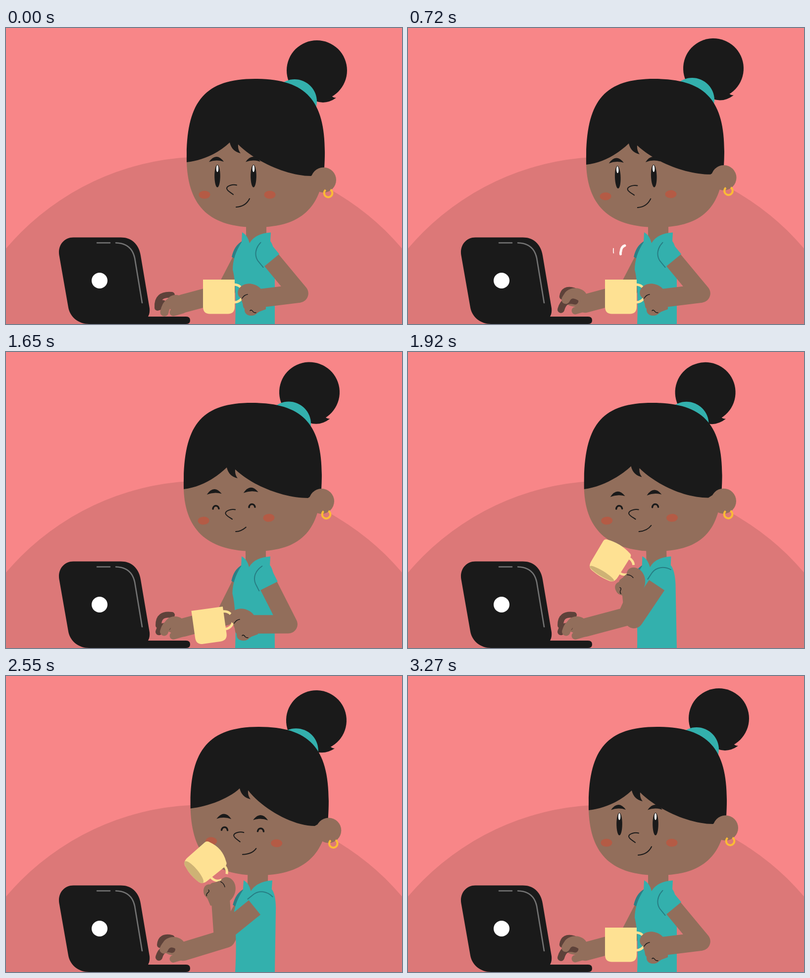
An HTML page that plays this animation: 800 by 600 pixels, repeating every 3.3 s.

```html
<!DOCTYPE html>
<html lang="en">
<head>
<meta charset="utf-8">
<title>Coffee break</title>
<style>
  html, body { margin: 0; width: 100%; height: 100%; overflow: hidden; background: #f88688; }
  svg { display: block; width: 100vw; height: 100vh; }
  .skin { fill: #926e5b; }
  .ink { fill: #1a1a1a; }
  .teal { fill: #33b0ad; }
  .line { fill: none; stroke: #1a1a1a; stroke-width: 2; stroke-linecap: round; }
  .limb { fill: none; stroke: #926e5b; stroke-width: 37.5; stroke-linecap: round; stroke-linejoin: round; }
  .finger { fill: none; stroke: #926e5b; stroke-linecap: round; }
  .far { fill: none; stroke: #5e423a; stroke-linecap: round; }
  .steam { fill: none; stroke: #fff5f3; stroke-linecap: round; }
  .seam { fill: none; stroke: #277d83; stroke-width: 2; stroke-linecap: round; }
</style>
</head>
<body>
<svg viewBox="0 0 800 600">
  <rect width="800" height="600" fill="#f88688"/>
  <circle cx="400" cy="784" r="523" fill="#dc7878"/>

  <g id="laptop">
    <path class="ink" d="M136 424.500H232C257 424.500 269 442 272 461L290 568Q291 578 287 585H364Q372 585 372 592.500T364 600H168C147 600 130 587 126 567L107.500 461C104 441 117 424.500 136 424.500Z"/>
    <path d="M184 435.500H210M222 435.500C245 436 256 448 260 466L275 557" fill="none" stroke="#747474" stroke-width="2.600" stroke-linecap="round"/>
    <circle cx="189" cy="512" r="16" fill="#fff"/>
  </g>

  <g id="farArm">
    <path class="far" id="farTop" stroke-width="12"/>
    <ellipse class="skin" id="palm"/>
    <path class="limb" id="farLimb"/>
    <path class="far" id="farLow" stroke-width="14"/>
    <path class="finger" id="index" stroke-width="17"/>
    <path class="finger" d="M357 566L338 571.500" stroke-width="15" id="thumb"/>
  </g>

  <g id="torso">
    <path d="M477 432Q461 441 456 464L463 468L478 445Z" fill="#2c7f85"/>
    <path class="skin" d="M485 380H526V425L492 440L485 425Z"/>
    <path class="teal" d="M477 414Q488 420 492 436Q504 416 535 414.500L534 432Q542 442 543 470V600H463Q466 520 458 490Q458 462 476 434Z"/>
  </g>

  <g id="bun">
    <circle class="ink" r="61"/>
    <path class="ink" d="M-18 54Q12 75 39 55.500Q33 55.500 29 51L0 40Z"/>
  </g>
  <circle class="teal" id="tie" r="45"/>
  <path class="skin" id="face"/>
  <path class="ink" id="hair"/>
  <g id="ear">
    <circle class="skin" r="25.500"/>
    <path d="M14 19.700A8.300 8.300 0 1 1 4.200 20.300" fill="none" stroke="#fbbb36" stroke-width="4"/>
  </g>

  <g id="features">
    <ellipse cx="-66" cy="0" rx="11.500" ry="8" fill="#b45b45"/>
    <ellipse cx="66" cy="0" rx="11.500" ry="8" fill="#b45b45"/>
    <g id="brows">
      <path class="ink" d="M-57-66.500Q-42-87-27-67Q-42-72-57-66.500Z"/>
      <path class="ink" d="M17-66.500Q32-87 47-67Q32-72 17-66.500Z"/>
    </g>
    <g id="openEyes">
      <ellipse class="ink" cx="-40" rx="5.800" ry="23"/>
      <ellipse cx="-40" cy="-15" rx="2.200" ry="7" fill="#fff"/>
      <ellipse class="ink" cx="33" rx="5.800" ry="23"/>
      <ellipse cx="33" cy="-15" rx="2.200" ry="7" fill="#fff"/>
    </g>
    <path class="line" id="shutEyes" style="stroke-width:3.500" d="M-46-23C-45-31-35-31-34-23M27-23C28-31 38-31 39-23"/>
    <path class="line" d="M-1-19.500C-9-22-21-18-21-13C-21-8-12-4-8-.500"/>
    <path class="line" id="smile"/>
    <path class="line" id="lips" d="M-18 13C-12 12-9 18-16 22C-8 23-9 33-17 33"/>
  </g>

  <path class="steam" id="wisp" stroke-width="5" pathLength="100" d="M416 503C412 487 423 486 430 474C435 464 427 460 430 453Q431 443 438 441"/>
  <path class="steam" id="thinWisp" stroke-width="1.800" pathLength="100" d="M431.500 502C429 494 433 490 432 486C428 472 413 468 415 447"/>

  <g id="mug">
    <path d="M31-25C55-24 55 10 31 11" pathLength="60" stroke-dasharray="18 17 25" fill="none" stroke="#fee193" stroke-width="5"/>
    <path id="cup" fill="#fee193"/>
    <ellipse id="base" cy="30.500" rx="28.500" fill="#ceb275"/>
  </g>
  <path class="limb" id="nearLimb"/>
  <g id="fist">
    <path class="skin" d="M23-17C16-29-2-36-16-29C-29-22-30-8-20-2C-19 3-18 6-17 8C-16 14-16 17-13 19C-14 28-8 34 3 33C11 32 12 27 17 25L30 20V-15Z"/>
    <path class="line" style="stroke-width:1.500" d="M-7-10Q-14-9-18-2M-2 23Q1 20 4 25Q7 28 10 27"/>
  </g>
  <g id="sleeve">
    <path class="teal" d="M-8-20H26V20.500H4Q-14 18-16-4Z"/>
    <path class="seam" d="M-16-6C-14 10-4 21 10 22L26 22"/>
  </g>
</svg>

<script>
const LOOP = 3300;
const parts = {};
document.querySelectorAll('svg [id]').forEach(n => parts[n.id] = n);

const set = (id, attrs) => {
  for (const k in attrs) parts[id].setAttribute(k, attrs[k]);
};
const place = (id, x, y, rot = 0) =>
  set(id, { transform: `translate(${x} ${y}) rotate(${rot})` });
const mix = (a, b, u) => a + (b - a) * u;
const clamp = u => Math.max(0, Math.min(1, u));
const smooth = u => u * u * (3 - 2 * u);
const ramp = (t, from, to) => smooth(clamp((t - from) / (to - from)));

// keys: [time, values] pairs, blended between neighbours
function blend(keys, t, ease = smooth) {
  const i = keys.findIndex(k => k[0] > t);
  if (i < 0) return keys[keys.length - 1][1];
  const [t0, a] = keys[i - 1], [t1, b] = keys[i];
  const u = ease((t - t0) / (t1 - t0));
  return a.map((v, n) => mix(v, b[n], u));
}

// hair shift, left and right drop, bun, tie, ear, features and turn, parting, lean
const HEAD = {
  rest:  [0, 0, 0, 628, 86, 583, 149, 641.5, 308, 0, 0, 0, 0, 0, 0],
  look:  [-5, 5, -4, 617, 82, 574, 146, 638, 303.5, -2, 1, -1.9, -6, 2, 0],
  ready: [-6, 6, -5, 613, 81.5, 571, 145.5, 637.5, 302.5, -2, 1, -2.5, -6, 2, -1],
  sip:   [-11, 6, -6, 594, 82, 558, 146, 637.5, 302, 2, 1, -2.5, 1, -2, -5],
  enjoy: [14.5, -7, 9, 639, 93, 596, 153, 657, 317, 18, -2, 3.5, 27, -5, 6]
};
const headKeys = [
  [0, HEAD.rest], [500, HEAD.look], [1300, HEAD.look], [1650, HEAD.ready], [2100, HEAD.sip],
  [2300, HEAD.sip], [2680, HEAD.enjoy], [2880, HEAD.enjoy], [3240, HEAD.rest]
];

// upper arm angle and length, fist and turn, mug and turn, raise
const ARM = {
  rest:  [50.4, 113, 495, 550, 0, 430, 545, 0, 0],
  ready: [63.2, 113, 479, 552, 0, 411, 555, -8, 0],
  sip:   [151, 107, 436, 431, 90, 406, 364, 49, 1],
  enjoy: [138, 109, 431, 436, 88, 402, 382, 50, 1]
};
const armKeys = [
  [0, ARM.rest], [1380, ARM.rest], [1650, ARM.ready], [2080, ARM.sip],
  [2330, ARM.sip], [2650, ARM.enjoy], [2900, ARM.enjoy], [3220, ARM.rest]
];

const tapKeys = [
  [0, [0]], [720, [2.32]], [1080, [3.5]], [1650, [5.167]],
  [2280, [7.5]], [2880, [9.25]], [3270, [10.32]], [LOOP, [10.42]]
];

function drawHead(t, p, raise) {
  const [dx, ly, ry, bunX, bunY, tieX, tieY, earX, earY, fx, fy, turn, px, py] = p;
  place('bun', bunX, bunY, turn);
  place('tie', tieX, tieY);
  place('ear', earX, earY);
  place('features', 467 + fx, 338 + fy, turn);

  const left = `${365 + dx} ${272 + ly}`, right = `${643 + dx} ${284 + ry}`;
  const chin = 505 + dx / 2, nape = 300 + ry * 0.8;
  set('face', { d: `M${left}C${368 + dx} 365 ${chin - 90} 404 ${chin} 404
    C${chin + 90} 404 ${636 + dx * 0.8} 365 ${right}L${610 + dx} 180H${400 + dx}Z` });
  set('hair', { d: `M${left}C${363 + dx} ${153 - ly / 2} ${398 + dx} 103 ${503 + dx} 103
    C${615 + dx} 103 ${651 + dx * 1.1} 155 ${right}L${616 + dx} ${nape}
    C${570 + dx} ${nape} ${505 + px * 0.6} ${272 + py} ${469 + px} ${236 + py}
    q-1 11 5 18q-18-4-22-22C${430 + px} ${253 + py} ${400 + dx} ${268 + ly} ${left}Z` });

  const shut = ramp(t, 1400, 1540) * (1 - ramp(t, 3000, 3120));
  const closed = shut > 0.85;
  set('openEyes', {
    transform: `translate(0 ${mix(-38, -27, shut)}) scale(1 ${1 - shut})`,
    opacity: closed ? 0 : 1
  });
  set('shutEyes', { opacity: closed ? 1 : 0 });
  set('brows', { transform: `translate(0 ${shut * (14 + 7 * raise)})` });

  const kissing = t > 1950 && t < 2430;
  set('lips', { opacity: kissing ? 1 : 0 });
  const smile = shut * (1 - raise);
  set('smile', {
    opacity: kissing ? 0 : 1,
    d: `M-2 25Q${mix(17, 9, smile)} ${mix(24, 25, smile)} ${mix(25, 19, smile)} ${mix(8, 17, smile) + 4 * raise}`
  });
}

function drawBody(lean) {
  const k = lean / 186;
  set('torso', { transform: `matrix(1 0 ${-k} 1 ${k * 600} 0)` });
}

function drawNearArm(p, lean) {
  const [angle, len, hx, hy, hr, mx, my, mr, k] = p;
  const sx = 520 + lean * 0.8, sy = 451 + Math.max(0, lean) * 0.6;
  const a = angle * Math.PI / 180;
  const ex = sx + len * Math.cos(a), ey = sy + len * Math.sin(a);
  const cut = 20;
  set('nearLimb', { d: `M${sx + cut * Math.cos(a)} ${sy + cut * Math.sin(a)}L${ex} ${ey}L${mix(hx, ex, 0.12)} ${mix(hy, ey, 0.12)}` });
  place('fist', hx, hy, hr);
  place('sleeve', sx, sy, angle);
  place('mug', mx, my, mr);

  // the rim bulges and the base shows as the mug tips
  const w = 32, r = 7 * k, foot = w - k;
  set('cup', { d: `M${-w} ${-35 + r * 1.5}Q${-w} ${-35 + r / 2} ${-w + r} ${-35 + r / 4}
    Q0 ${-35 - 10 * k} ${w - r} ${-35 + r / 4}Q${w} ${-35 + r / 2} ${w} ${-35 + r * 1.5}
    L${foot} 20Q${foot} ${34.5 + k} 18 ${34.5 + 2 * k}Q0 ${34.5 + 6 * k} -18 ${34.5 + 2 * k}
    Q${-foot} ${34.5 + k} ${-foot} 20Z` });
  set('base', { ry: 8 * k, opacity: clamp(k * 3 - 1) });
}

function drawFarArm(t, lean) {
  const lift = (1 - Math.cos(2 * Math.PI * blend(tapKeys, t, u => u)[0])) / 2;
  const arch = 40 * lift * (1 - lift);
  const up = Math.max(0, lean);
  const at = (a, b) => mix(a, b, lift);
  set('farLimb', { d: `M358 558.500L${442 + up * 0.8} ${536 - up * 1.3}L${474 + lean} 474` });
  set('palm', { cx: at(343, 336), cy: at(557, 542), rx: at(19, 26), ry: at(16, 20) });
  set('farTop', { d: `M${at(306, 314)} ${at(567, 547) - arch}Q${at(304, 318)} ${at(538, 533) - arch} 335 ${at(541, 540) - arch}` });
  set('farLow', { d: `M${at(320, 344)} ${at(560, 551)}Q${at(312, 317)} ${at(555, 544)} 309 ${at(565, 573)}` });
  set('index', { d: `M352 ${at(556, 544)}Q${at(326, 328)} ${at(546, 525)} ${at(320, 318)} ${at(576, 541)}` });
  set('thumb', { transform: `translate(0 ${at(5, 0)})` });
}

function drawSteam(t) {
  const age = t < 900 ? t - 120 : t - 900;
  const dash = (id, delay, lag) => {
    const head = clamp((age - delay) / 425) * 100;
    const tail = clamp((age - delay - lag) / 425) * 100;
    set(id, {
      'stroke-dasharray': `${head - tail} 200`,
      'stroke-dashoffset': -tail,
      opacity: head - tail > 0.5 ? 1 : 0
    });
  };
  dash('wisp', 0, 300);
  dash('thinWisp', 70, 170);
}

function draw(t) {
  const head = blend(headKeys, t), arm = blend(armKeys, t);
  const lean = head[14];
  drawFarArm(t, lean);
  drawBody(lean);
  drawHead(t, head, arm[8]);
  drawSteam(t);
  drawNearArm(arm, lean);
}

const start = performance.now();
function tick() {
  draw((performance.now() - start) % LOOP);
  requestAnimationFrame(tick);
}
tick();
</script>
</body>
</html>
```
